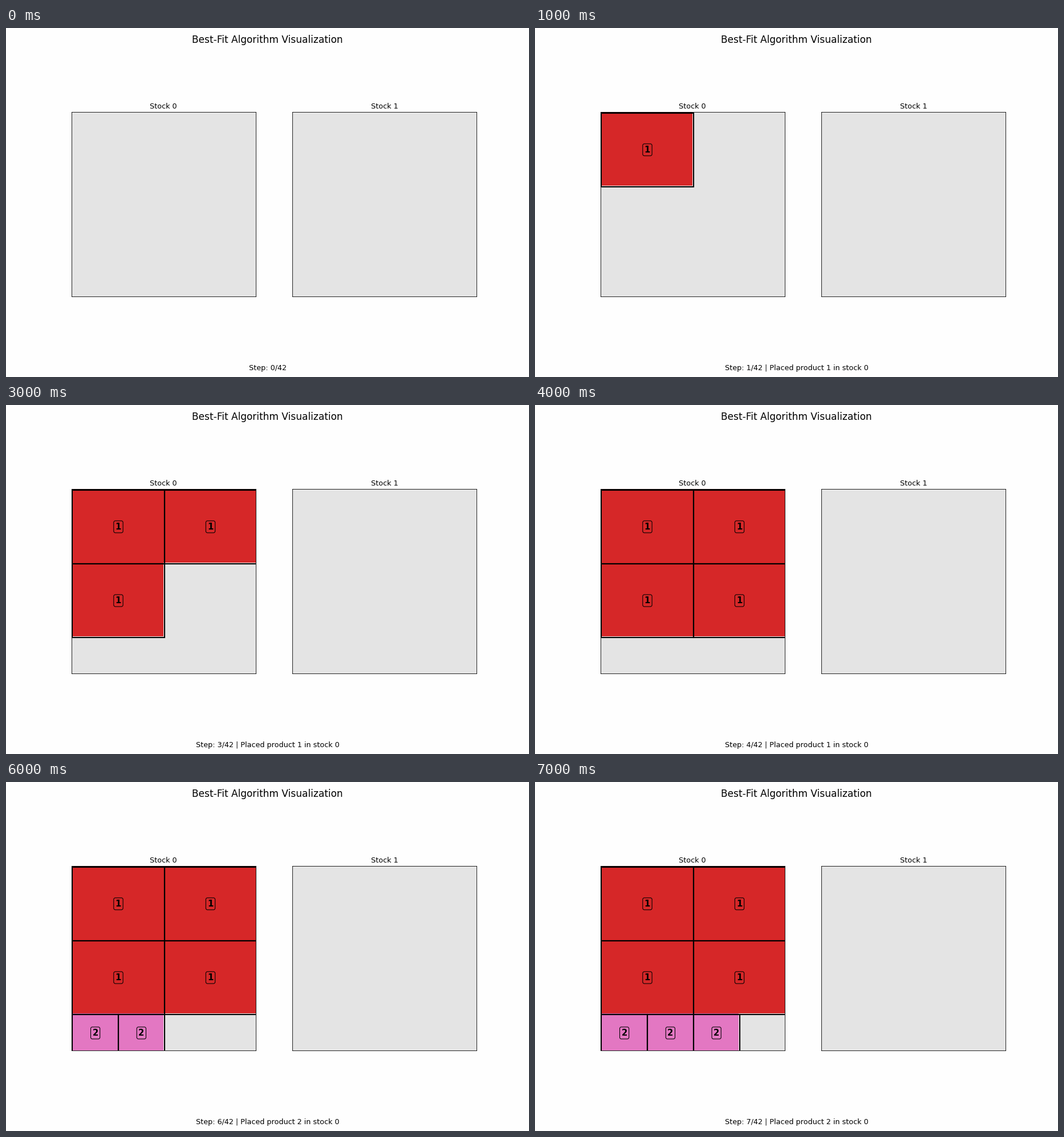
A matplotlib script that plays this animation: 917 px wide and 611 px high, repeating every 8 s.

```python
import matplotlib.pyplot as plt
from matplotlib.animation import FuncAnimation
from matplotlib.patches import Rectangle

W, H, DPI = 917, 611, 76.4
SIZE = 100          # cells along each side of a stock
STEPS = 42
COLORS = {1: "tab:red", 2: "tab:pink"}

# Placements in order: product, x, y, width, height
blocks = [(1, x, y, 50, 40) for y in (0, 40) for x in (0, 50)]
blocks += [(2, x, 80, 25, 20) for x in (0, 25, 50)]

plt.rcParams["font.family"] = "DejaVu Sans"
# The tiny margin keeps the pixel size from being rounded down
fig, axes = plt.subplots(
    1, 2, figsize=((W + 1e-6) / DPI, (H + 1e-6) / DPI), dpi=DPI, facecolor="#fefefe"
)
fig.suptitle("Best-Fit Algorithm Visualization", fontsize=16)
status = fig.text(0.5, 0.02, "", ha="center", fontsize=12)

for i, ax in enumerate(axes):
    ax.set_title(f"Stock {i}", fontsize=12)
    ax.set_facecolor("#e4e4e4")
    ax.set(xlim=(-0.5, SIZE - 0.5), ylim=(SIZE - 0.5, -0.5), xticks=[], yticks=[])
    ax.set_aspect("equal")


def add_block(ax, product, x, y, w, h):
    """Fill sits on the cell grid, the outline half a cell further on."""
    color = COLORS[product]
    corner = (x - 0.5, y - 0.5)
    gap = Rectangle(corner, w + 0.5, h + 0.5, fc="white", lw=0, zorder=0.5)
    fill = Rectangle(corner, w, h, fc=color, lw=0, zorder=0.8)
    edge = Rectangle((x, y), w, h, fill=False, ec="black", lw=2, zorder=1)
    for patch in (gap, fill, edge):
        ax.add_patch(patch)
    label = ax.text(
        x + w / 2, y + h / 2, str(product), ha="center", va="center",
        fontsize=14, fontweight="bold",
        bbox=dict(boxstyle="round,pad=0.2", fc=color, ec="black", lw=1),
    )
    return gap, fill, edge, label


placed = [add_block(axes[0], *b) for b in blocks]


def update(step):
    for i, parts in enumerate(placed):
        for part in parts:
            part.set_visible(i < step)
    text = f"Step: {step}/{STEPS}"
    if step:
        text += f" | Placed product {blocks[step - 1][0]} in stock 0"
    status.set_text(text)
    return [status]


anim = FuncAnimation(fig, update, frames=len(blocks) + 1, interval=1000, repeat=True)
plt.show()
```
